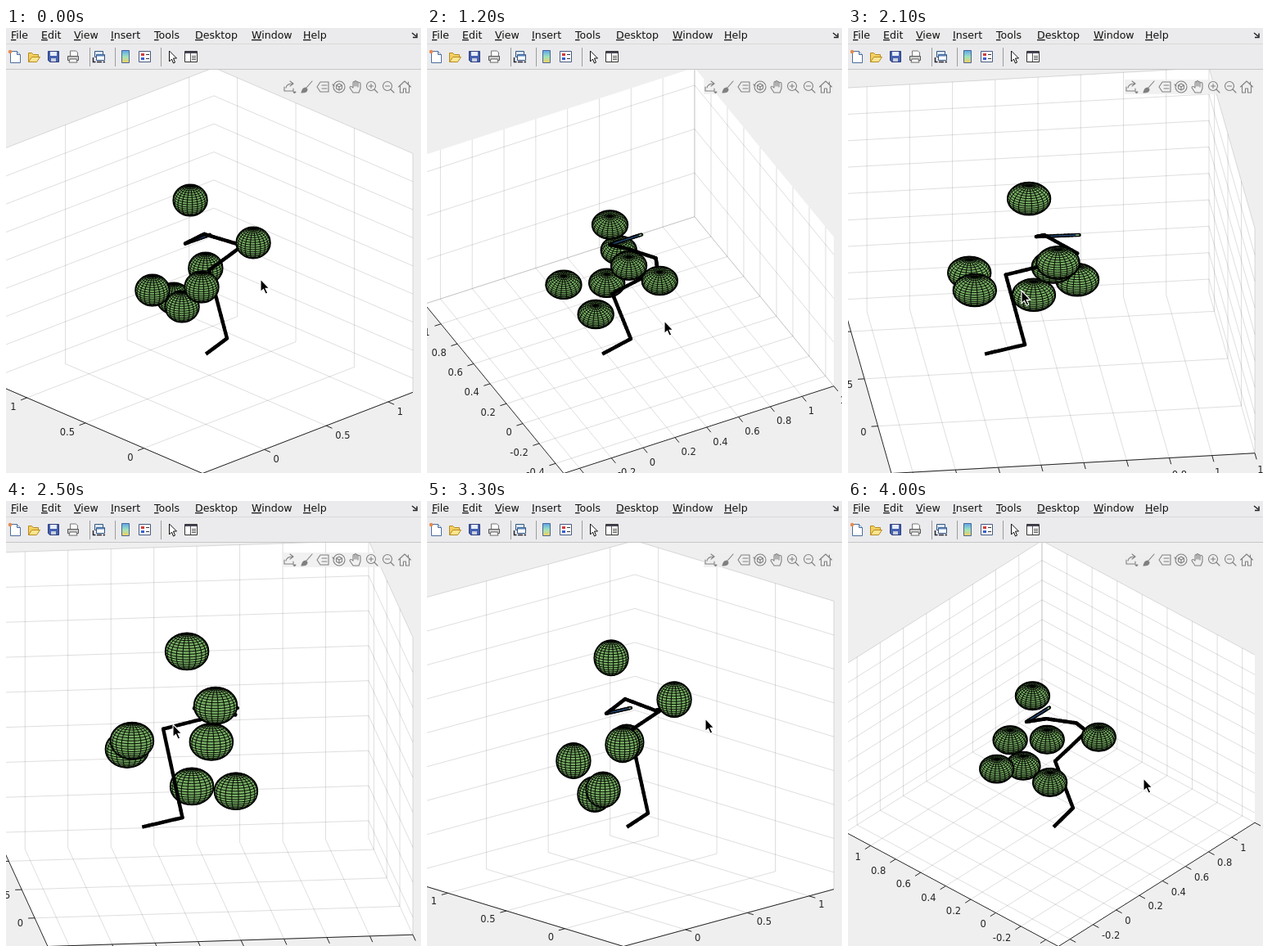
An HTML page with a canvas for the animation above (4100 ms loop, 507 by 544 pixels).

```html
<!DOCTYPE html>
<html lang="en">
<head>
<meta charset="utf-8">
<title>Robot arm plot</title>
<style>
  html, body { margin: 0; width: 100%; height: 100%; overflow: hidden; background: #efefef; }
  canvas, svg { position: absolute; left: 0; top: 0; width: 507px; height: 544px; }
  text { font: 12.6px "DejaVu Sans", sans-serif; fill: #111; }
  .key { text-decoration: underline; }
  .tools { fill: none; stroke: #808080; stroke-width: 1.1; stroke-linecap: round; stroke-linejoin: round; }
  .sep { stroke: #9c9c9c; }
</style>
</head>
<body>
<canvas id="plot" width="507" height="544"></canvas>
<svg viewBox="0 0 507 544">
  <rect width="507" height="51" fill="#ebebed"/>
  <path d="M0 19.5H507" stroke="#d8d8d8"/>
  <path d="M0 50.5H507" stroke="#c6c6c6"/>
  <g id="menu"></g>
  <path d="M496 6l5 4M502 6.5v5h-5" fill="none" stroke="#222" stroke-width="1.5"/>
  <path class="sep" d="M102.500 24v23M133.500 24v23M189.500 24v23"/>

  <!-- figure toolbar -->
  <path d="M5.500 28.500h8l4 4v10h-12z" fill="#fff" stroke="#4a6d9c"/>
  <path d="M13.500 28.500v4h4" fill="#cfe0f2" stroke="#4a6d9c"/>
  <circle cx="5" cy="29" r="2.200" fill="#e8894b"/>
  <path d="M27.500 41.500v-11h4l2 2h6v3" fill="#f4d060" stroke="#b58a22"/>
  <path d="M27.500 41.500l4-6h10l-4 6z" fill="#fbe58e" stroke="#b58a22"/>
  <path d="M51.500 28.500h13v13h-11l-2-2z" fill="#4661b0" stroke="#2b3c7c"/>
  <path d="M54 29h8v5h-8z" fill="#e8edf8"/><path d="M55 37h6v4h-6z" fill="#c9cfdd"/>
  <path d="M78.500 34v-6h7l2 2v4" fill="#fff" stroke="#777"/>
  <path d="M75.500 34.500h13v5h-13z" fill="#c9c9c9" stroke="#555"/>
  <path d="M78 38h8l1 4h-10z" fill="#fff" stroke="#666"/>
  <path d="M108.500 28.500h10v7h-10z" fill="#dce8f6" stroke="#33547e"/>
  <path d="M110.500 32.500h10v7h-10z" fill="#f7faff" stroke="#33547e"/>
  <path d="M111 33.500h9" stroke="#5a82b8" stroke-width="2"/>
  <path d="M106.500 36v5.500h3m9 0h2.500M111 41.500h6" fill="none" stroke="#223" stroke-width="1.500"/>
  <linearGradient id="bar" x2="0" y2="1"><stop stop-color="#5ea5ea"/><stop offset=".5" stop-color="#9fe2bd"/><stop offset="1" stop-color="#f4d05c"/></linearGradient>
  <path d="M141.500 27.500h9v15h-9z" fill="url(#bar)" stroke="#47639a"/>
  <path d="M162.500 28.500h14v13h-14z" fill="#fff" stroke="#45597f"/>
  <path d="M165 31h4v3h-4z" fill="#d33c3c"/><path d="M165 36h4v3h-4z" fill="#3b5fd0"/>
  <path d="M171 32.500h4m-4 5h4" stroke="#333"/>
  <path d="M199.500 28v13l3-3 2 5 2-1-2-5h4z" fill="#fff" stroke="#111"/>
  <path d="M218.500 28.500h15v13h-15z" fill="#fff" stroke="#333"/>
  <path d="M219 30h14" stroke="#445" stroke-width="2"/>
  <path d="M225.500 31v10M227 34.500h5m-5 2h5m-5 2h5" stroke="#555"/>

  <!-- axes toolbar -->
  <rect x="338" y="63" width="159" height="18" fill="#efefef" fill-opacity=".85"/>
  <g class="tools">
    <path d="M340 72v5h11v-3M342 73c1-4 4-5 8-5m-3-3l4 3-4 3"/><path d="M351 78h3l-1.500 1.500z"/>
    <path d="M374 65l-7 8M361 79c1-4 2-6 5-6l2 2c0 3-3 4-7 4z" fill="#808080"/>
    <path d="M384 66h10v12h-10l-4-6zM386 70h6m-6 4h6"/>
    <circle cx="407" cy="72" r="7"/><path d="M403.500 70l3.500-2 3.500 2v4l-3.500 2-3.500-2zM403.500 70l3.500 2 3.500-2M407 72v4M399 69l2 2"/>
    <path d="M424 79l-4-6c0-2 2-2 4 0v-6c0-2 2-2 2 0v-1c0-2 2-2 2 0v1c0-2 2-2 2 0v1c0-2 3-2 3 0v6l-2 5zM426 67v4m2-4v4m2-3v4"/>
    <circle cx="446" cy="71" r="5.500"/><path d="M450 75l4 4M443.500 71h5m-2.500-2.500v5"/>
    <circle cx="466" cy="71" r="5.500"/><path d="M470 75l4 4M463.500 71h5"/>
    <path d="M479.500 72l7.500-7 7.500 7M481.500 71v8h4v-5h3v5h4v-8M491.500 66v3"/>
  </g>

  <path id="cursor" d="M0 0v15.500l3.500-3.200 2.700 6 2.600-1.200-2.700-5.700h4.700z" fill="#000" stroke="#fff" stroke-width="1.100"/>
</svg>
<script>
const ctx = document.getElementById('plot').getContext('2d');
const cursor = document.getElementById('cursor');
const FRAMES = 41, STEP = 100, LO = -0.5, HI = 1.2, SPAN = HI - LO, RAD = Math.PI / 180;

document.getElementById('menu').innerHTML =
  [['File', 6], ['Edit', 43], ['View', 83], ['Insert', 128], ['Tools', 181], ['Desktop', 231], ['Window', 300], ['Help', 363]]
    .map(([s, x]) => `<text x="${x}" y="13"><tspan class="key">${s[0]}</tspan>${s.slice(1)}</text>`).join('');

// step, azimuth, elevation
const turn = [[0, -43.4, 26.3], [5, -43.4, 26.3], [8, -39.06, 49.9], [16, -15.2, 52.7], [21, -7.19, 35.8],
  [25, -6.9, 18.1], [33, -43.4, 16.1], [40, -47.3, 45.1]];
// step, pointer x, pointer y
const pointer = [[0, 311, 307], [4, 346, 293], [5, 346, 293], [8, 330, 347], [16, 247, 362], [21, 212, 321],
  [25, 204, 273], [33, 340, 266], [40, 361, 339]];

const balls = [[.258, .406, .862], [.336, -.05, .697], [-.017, .438, .303], [-.049, -.016, .5],
  [.37, .393, .345], [.294, .514, .054], [.539, .844, -.09]];
const BALL_R = 0.1;
const arm = [[0, 0, 0], [.19, .02, .04], [.109, .088, .528], [.403, .106, .601], [.464, .246, .544],
  [.324, .357, .616], [.303, .496, .506], [.505, .5, .498]];

// Monotone cubic interpolation through rows of [step, ...values]
function sample(keys, n, col) {
  let i = 0;
  while (i < keys.length - 2 && n > keys[i + 1][0]) i++;
  const slope = k => (keys[k + 1][col] - keys[k][col]) / (keys[k + 1][0] - keys[k][0]);
  const tangent = k => {
    if (k === 0) return slope(0);
    if (k === keys.length - 1) return slope(k - 1);
    const a = slope(k - 1), b = slope(k);
    return a * b > 0 ? 2 * a * b / (a + b) : 0;
  };
  const h = keys[i + 1][0] - keys[i][0], t = (n - keys[i][0]) / h, u = 1 - t;
  return keys[i][col] * (1 + 2 * t) * u * u + keys[i + 1][col] * (3 - 2 * t) * t * t
    + h * t * u * (tangent(i) * u - tangent(i + 1) * t);
}

// Orthographic view stretched to fill the axes rectangle
function makeView(az, el) {
  const c = Math.cos(az * RAD), s = Math.sin(az * RAD), ce = Math.cos(el * RAD), se = Math.sin(el * RAD);
  const w = Math.abs(c) + Math.abs(s), sx = 500 / w, sy = 496 / (se * w + ce);
  const unit = v => (v - (LO + HI) / 2) / SPAN;
  const facing = (x, y, z) => ce * (s * x - c * y) + se * z;
  return {
    sx, sy, facing,
    at(x, y, z) {
      const a = unit(x), b = unit(y), h = unit(z);
      return [247 + sx * (c * a + s * b), 296.5 - sy * (se * (c * b - s * a) + ce * h), facing(a, b, h)];
    }
  };
}

function trace(points) {
  ctx.beginPath();
  points.forEach(p => ctx.lineTo(p[0], p[1]));
}

function ticks(step) {
  const out = [];
  for (let k = Math.ceil(LO / step - 1e-6); k * step <= HI + 1e-6; k++) out.push(+(k * step).toFixed(1));
  return out;
}

function drawAxes(view) {
  const P = view.at, near = P(LO, LO, LO), right = P(HI, LO, LO), left = P(LO, HI, LO);
  const line = (...pts) => { trace(pts); ctx.stroke(); };
  ctx.fillStyle = '#fff';
  trace([near, right, P(HI, LO, HI), P(HI, HI, HI), P(LO, HI, HI), left]);
  ctx.fill();

  const stepFor = end => Math.abs(end[0] - near[0]) + 1.4 * (near[1] - end[1]) > 415 ? 0.2 : 0.5;
  const xs = ticks(stepFor(right)), ys = ticks(stepFor(left));
  const zs = ticks(near[1] - P(LO, LO, HI)[1] > 199 ? 0.2 : 0.5);
  ctx.lineWidth = 1;
  ctx.strokeStyle = 'rgba(38,38,38,.15)';
  xs.forEach(v => line(P(v, LO, LO), P(v, HI, LO), P(v, HI, HI)));
  ys.forEach(v => line(P(LO, v, LO), P(HI, v, LO), P(HI, v, HI)));
  zs.forEach(v => line(P(LO, HI, v), P(HI, HI, v), P(HI, LO, v)));

  ctx.strokeStyle = ctx.fillStyle = '#262626';
  line(left, near, right);
  ctx.font = '11.5px "DejaVu Sans", sans-serif';
  const ruler = (values, place, other, align, reach) => {
    const dx = near[0] - other[0], dy = near[1] - other[1], len = Math.hypot(dx, dy);
    const ux = dx / len, uy = dy / len;
    ctx.textAlign = align;
    values.forEach(v => {
      const [x, y] = place(v);
      line([x, y], [x + 8 * ux, y + 8 * uy]);
      ctx.fillText(v, x + reach * ux, y + 10 + 15 * uy);
    });
  };
  ruler(xs, v => P(v, LO, LO), left, 'left', 12);
  ruler(ys, v => P(LO, v, LO), right, 'right', 14);
}

function drawBall(view, [x, y, z]) {
  const [cx, cy] = view.at(x, y, z), r = BALL_R / SPAN;
  ctx.beginPath();
  ctx.ellipse(cx, cy, r * view.sx, r * view.sy, 0, 0, 2 * Math.PI);
  ctx.fillStyle = '#78b164';
  ctx.fill();
  ctx.strokeStyle = '#000';
  ctx.lineWidth = 1.7;
  ctx.stroke();

  ctx.beginPath();
  let pen = false;
  const visit = (lat, lon) => {
    const a = lat * RAD, b = lon * RAD;
    const nx = Math.cos(a) * Math.cos(b), ny = Math.cos(a) * Math.sin(b), nz = Math.sin(a);
    if (view.facing(nx, ny, nz) < 0) { pen = false; return; }
    const [px, py] = view.at(x + BALL_R * nx, y + BALL_R * ny, z + BALL_R * nz);
    pen ? ctx.lineTo(px, py) : ctx.moveTo(px, py);
    pen = true;
  };
  for (let lat = -81; lat < 90; lat += 9, pen = false)
    for (let lon = 0; lon <= 360; lon += 9) visit(lat, lon);
  for (let lon = 0; lon < 360; lon += 18, pen = false)
    for (let lat = -90; lat <= 90; lat += 9) visit(lat, lon);
  ctx.lineWidth = 0.95;
  ctx.stroke();
}

function drawScene(view) {
  const items = balls.map(b => ({ depth: view.at(...b)[2], draw: () => drawBall(view, b) }));
  const PARTS = 12, last = arm.length - 2;
  const stroke = (p, q, color, width, cap, lift) => items.push({
    depth: (p[2] + q[2]) / 2 + lift,
    draw() {
      ctx.strokeStyle = color;
      ctx.lineWidth = width;
      ctx.lineCap = cap;
      trace([p, q]);
      ctx.stroke();
      ctx.lineCap = 'butt';
    }
  });
  for (let i = 0; i <= last; i++) {
    const point = t => view.at(...arm[i].map((v, k) => v + (arm[i + 1][k] - v) * t));
    for (let j = 0; j < PARTS; j++) {
      const p = point(j / PARTS), q = point((j + 1) / PARTS);
      stroke(p, q, '#000', 4.4, i + j ? 'round' : 'butt', 0);
      if (i === last && j > 0)
        stroke(p, q, j === PARTS - 1 ? '#8fb98a' : '#23466f', 1.6, 'butt', 0.012);
    }
  }
  items.sort((a, b) => a.depth - b.depth).forEach(it => it.draw());
}

let shown = -1;
function tick(now) {
  const n = Math.floor(now / STEP) % FRAMES;
  if (n !== shown) {
    shown = n;
    ctx.fillStyle = '#efefef';
    ctx.fillRect(0, 0, 507, 544);
    const view = makeView(sample(turn, n, 1), sample(turn, n, 2));
    drawAxes(view);
    drawScene(view);
    const [x, y] = [1, 2].map(col => Math.round(sample(pointer, n, col)));
    cursor.setAttribute('transform', `translate(${x} ${y})`);
  }
  requestAnimationFrame(tick);
}
tick(0);
</script>
</body>
</html>
```
